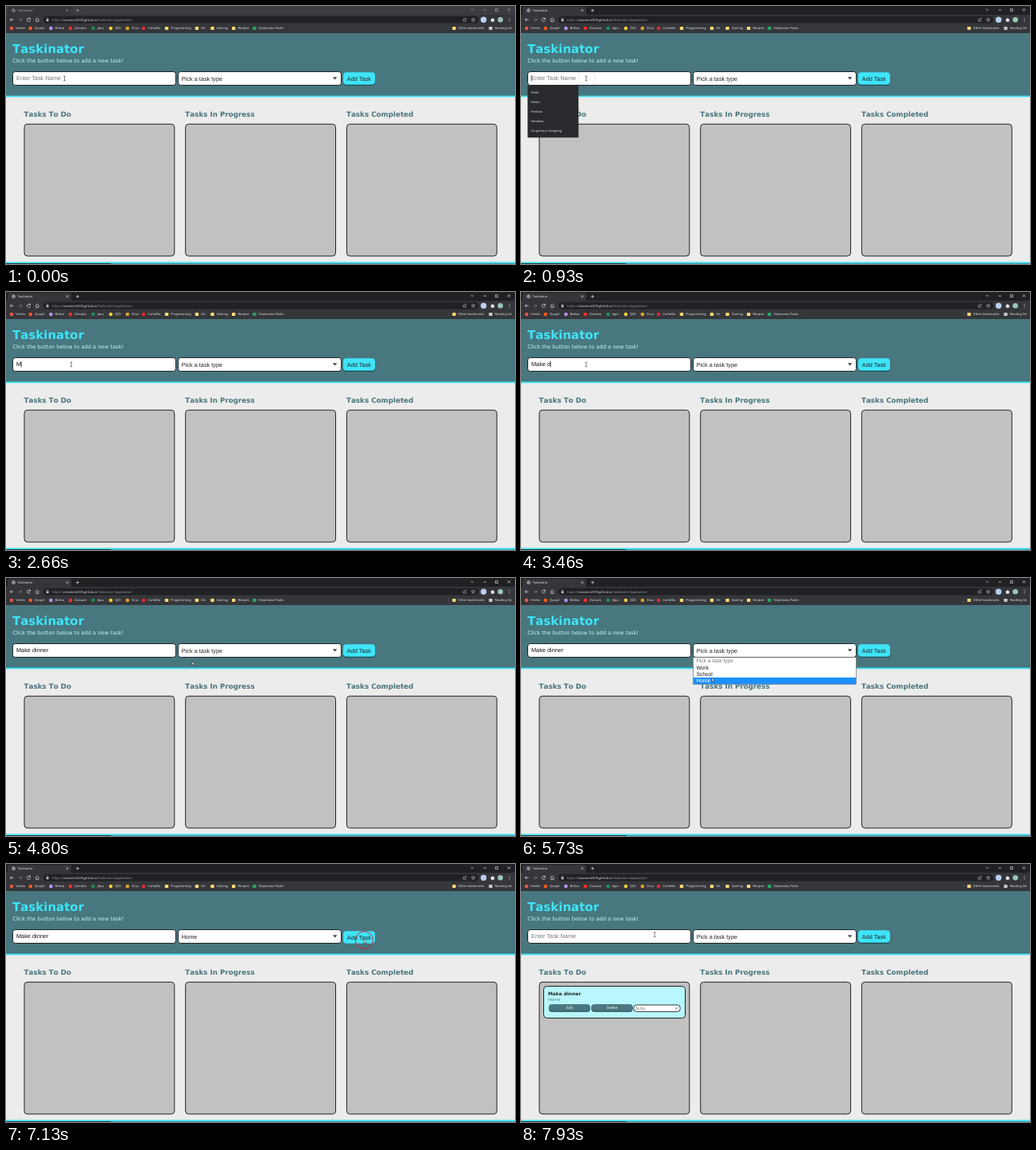
An HTML page that plays this animation: 640x324 px, repeating every 8 s.

```html
<!DOCTYPE html>
<html lang="en">
<head>
<meta charset="utf-8">
<title>Taskinator</title>
<style>
html, body { margin: 0; width: 100%; height: 100%; overflow: hidden; background: #ececec; }
svg { display: block; width: 100vw; height: 100vh; text-rendering: geometricPrecision; }
.ui { font: 4px "Open Sans", "Noto Sans", sans-serif; fill: #e8eaed; }
.dim { fill: #9aa0a6; }
.page { font-family: "DejaVu Sans", Verdana, sans-serif; font-kerning: none; }
.head { font-weight: bold; font-size: 8.75px; fill: #48747c; }
.form { font: 7.33px "Liberation Sans", Arial, sans-serif; fill: #222; }
.small { font: 4.7px "Liberation Sans", Arial, sans-serif; }
.line { fill: none; stroke: #dfe1e5; stroke-width: .7; }
.box { stroke: #1d2426; stroke-width: 1; }
</style>
</head>
<body>
<svg viewBox="0 0 640 324" preserveAspectRatio="none">
  <!-- browser window -->
  <g class="ui">
    <rect id="strip" width="640" height="12"/>
    <path d="M0 11.5Q2 11.5 2 9V3Q2 1 4 1H80Q82 1 82 3V9Q82 11.5 84 11.5Z" fill="#35363a"/>
    <rect y="11" width="640" height="23.5" fill="#35363a"/>
    <rect x="47" y="12.8" width="547" height="8.8" rx="4.4" fill="#202124"/>
    <g id="tabBits">
      <circle class="line" cx="9.5" cy="5.6" r="1.9"/>
      <path class="line" d="M7.6 5.6H11.4M9.5 3.7V7.5" style="stroke-width:.4"/>
      <text x="14.5" y="7.1">Taskinator</text>
      <path class="line" d="M75.8 4.3l2.5 2.5m0-2.5l-2.5 2.5M88 5.6h4M90 3.6v4"/>
      <path class="line" d="M584.5 3.9l1.7 1.6 1.7-1.6M600.3 5h3.6M615.4 3.6h2.9v2.9h-2.9zM630.8 3.2l3.2 3.2m0-3.2l-3.2 3.2"/>
    </g>
    <path class="line" d="M9.3 17.2H5.2m1.9-2l-2 2 2 2M30.3 16.1a2.1 2.1 0 1 0 .2 1.8m0-3.2v1.7h-1.7M37 17.2l2.3-2.2 2.3 2.2M37.8 16.8v2.7h3v-2.7"/>
    <path class="line" d="M16 17.2h4m-1.9-2l2 2-2 2" style="stroke:#85888c"/>
    <path d="M50.7 16.6h2.9v2.6h-2.9z" fill="#bdc1c6"/>
    <path class="line" d="M51.3 16.6v-.8a.8.8 0 0 1 1.7 0v.8" style="stroke-width:.5"/>
    <text x="58" y="18.7"><tspan class="dim">https://</tspan>corwenn2839.github.io<tspan class="dim">/Taskinator-Application/</tspan></text>
    <path class="line" d="M575 16v3h3.5v-1.2M576 17.6q.3-2 2.8-2m-1-1l1 1-1 1" style="stroke-width:.5"/>
    <path class="line" d="M587.5 14.8l.7 1.6 1.7.1-1.3 1.1.4 1.7-1.5-.9-1.5.9.4-1.7-1.3-1.1 1.7-.1z" style="stroke-width:.5"/>
    <circle cx="600.5" cy="17.2" r="3.7" fill="#b9cff0"/>
    <path d="M609.8 16h1.2a.7.7 0 0 1 1.4 0h1.2v1.2a.7.7 0 0 1 0 1.4v1.1h-3.8z"/>
    <circle cx="621.6" cy="17.2" r="3.3" fill="#9cc7b6"/>
    <circle cx="633" cy="15.5" r=".5"/><circle cx="633" cy="17.2" r=".5"/><circle cx="633" cy="18.9" r=".5"/>
    <path d="M556.8 25.5v5" stroke="#5f6368" stroke-width=".4"/>
    <g id="bookmarks"></g>
  </g>

  <!-- page -->
  <rect y="34" width="640" height="79" fill="#48777f"/>
  <rect y="112.6" width="640" height="2" fill="#3ee4f8"/>
  <rect y="114.6" width="640" height="210" fill="#ececec"/>
  <rect y="321.4" width="640" height="2.6" fill="#3ee4f8"/>
  <rect y="323.3" width="640" height=".7" fill="#48777f"/>
  <rect y="323" width="132" height="1" fill="#2b3638"/>
  <g class="page">
    <text x="8" y="59.3" font-size="15" font-weight="bold" fill="#3ee4f8">Taskinator</text>
    <text x="8.3" y="70.7" font-size="6.7" fill="#c4f6fb">Click the button below to add a new task!</text>
    <g id="columns"></g>
  </g>
  <g class="form">
    <rect class="box" x="8.5" y="82.5" width="205" height="17" rx="3.2" fill="#fff"/>
    <text id="name" x="13" y="93.4"></text>
    <path id="caret" d="M0 87v7.6" stroke="#000" stroke-width=".6"/>
    <rect class="box" x="216.5" y="82.5" width="205" height="17" rx="3.2" fill="#fff"/>
    <text id="type" x="220.8" y="93.6"></text>
    <path d="M410.8 89.3h5.6l-2.8 3.2z" fill="#444"/>
    <rect id="shade" x="424" y="84" width="40" height="15.9" rx="4" fill="#1f4a52"/>
    <g id="add">
      <rect x="424" y="83.3" width="40" height="15.4" rx="4" fill="#3ee4f8"/>
      <text x="428.8" y="93.6">Add Task</text>
    </g>
  </g>

  <g id="card">
    <rect class="box" x="28.5" y="153.5" width="178" height="40" rx="4" fill="#b8f7fe"/>
    <g class="page">
      <text x="34" y="165" font-size="5.9" font-weight="bold" fill="#222">Make dinner</text>
      <text x="34" y="171.8" font-size="5.2" fill="#5c7f84">Home</text>
    </g>
    <g class="small" fill="#fff" text-anchor="middle">
      <rect x="35" y="176.6" width="52" height="9.2" rx="3.8" fill="#1f3f45"/>
      <rect x="35" y="176.2" width="52" height="8.6" rx="3.8" fill="#48777f"/>
      <text x="61" y="182.1">Edit</text>
      <rect x="88.5" y="176.6" width="52" height="9.2" rx="3.8" fill="#1f3f45"/>
      <rect x="88.5" y="176.2" width="52" height="8.6" rx="3.8" fill="#48777f"/>
      <text x="114.5" y="182.1">Delete</text>
    </g>
    <rect class="box" x="141.8" y="177" width="58.4" height="8.4" rx="3.6" fill="#fff" style="stroke-width:.9"/>
    <text class="small" x="143.8" y="183" fill="#555">To Do</text>
    <path d="M193.8 180.5l1.5 1.4 1.5-1.4" fill="none" stroke="#222" stroke-width=".8"/>
  </g>

  <g id="suggest" class="ui" font-weight="600">
    <rect x="8.3" y="100" width="64" height="65.3" rx="1" fill="#292a2d"/>
  </g>
  <g id="options" class="form" style="font-size:6.67px">
    <rect x="216.3" y="99.6" width="205.2" height="34" fill="#fff" stroke="#555" stroke-width=".6"/>
    <rect id="pick" x="216.6" width="204.6" height="8.35" fill="#1e90ff"/>
  </g>

  <circle id="ring" fill="none" stroke="#c8283c" stroke-width="1"/>
  <path id="beam" d="M-1.3-2.8h1q.3 0 .3.4v4.8q0 .4-.3.4h-1M1.3-2.8h-1q-.3 0-.3.4M1.3 2.8h-1q-.3 0-.3-.4" fill="none" stroke="#222" stroke-width=".6"/>
  <path id="arrow" d="M0 0v4.6l1-1 .8 1.7.8-.4-.8-1.6h1.5z" fill="#fff" stroke="#111" stroke-width=".5"/>
</svg>
<script>
const LOOP = 8000;
const $ = id => document.getElementById(id);

function add(parent, tag, attrs, text) {
  const node = document.createElementNS("http://www.w3.org/2000/svg", tag);
  for (const key in attrs) node.setAttribute(key, attrs[key]);
  if (text) node.textContent = text;
  return parent.appendChild(node);
}

const FOLDER = "#f8d775";
const bookmarks = [
  ["Vmelo", 7, "#e5574c"], ["Quopli", 30.8, "#ff5a1f"], ["Brelva", 56.5, "#b794f6"],
  ["Zunavio", 81, "#f0302c"], ["Jepu", 109.5, "#1c8f5c"], ["QZX", 131.7, "#f2cf3b"],
  ["Drux", 152.7, "#e0a02c"], ["Corkellia", 173, "#dd2a3b"], ["Programming", 202, FOLDER],
  ["Art", 240, FOLDER], ["Gaming", 259.5, FOLDER], ["Recipes", 286.2, FOLDER],
  ["Stepmania Packs", 312.4, "#27a567"], ["Other bookmarks", 563.4, FOLDER], ["Reading list", 609.4, "#c5c8cc"]
];
for (const [label, x, fill] of bookmarks) {
  if (x > 200) add($("bookmarks"), "rect", { x: x - 2.2, y: 25.9, width: 4.4, height: 4.2, rx: .5, fill });
  else add($("bookmarks"), "circle", { cx: x, cy: 28, r: 2.3, fill });
  add($("bookmarks"), "text", { x: x + 5.2, y: 29.4 }, label);
}

["Tasks To Do", "Tasks In Progress", "Tasks Completed"].forEach((title, i) => {
  const x = 23 + 202.7 * i;
  add($("columns"), "text", { class: "head", x: x - .4, y: 139 }, title);
  add($("columns"), "rect", { class: "box", x, y: 148.3, width: 188.8, height: 165.7, rx: 4, fill: "#c1c1c1" });
});

["Hello", "Henlo", "Henlow", "henelow", "Go grocery shopping"].forEach((word, i) =>
  add($("suggest"), "text", { x: 12.5, y: 110.2 + 12 * i }, word));

const ROW = 8.35, LIST_TOP = 99.9;
const options = ["Pick a task type", "Work", "School", "Home"].map((word, i) =>
  add($("options"), "text", { x: 220.4, y: LIST_TOP + 6.4 + ROW * i }, word));

// Moments of the session, in ms
const FOCUS = 620, SUGGEST = 760, TYPE = 2650, KEY = 140, OPEN = 5130, CHOOSE = 5900,
      PRESS = 7000, SUBMIT = 7220;
const TASK = "Make dinner";
const TYPED = TYPE + KEY * (TASK.length - 1);
const clicks = [FOCUS, OPEN - 50, CHOOSE - 50, PRESS];

// Pointer stops: time, x, y
const path = [
  [0, 73.5, 91], [100, 73.5, 91], [500, 82, 91], [4190, 82, 91], [4720, 233.8, 105],
  [4820, 233.8, 105], [5040, 238, 93], [5200, 238, 93], [5620, 240, 125.6], [6000, 240, 125.6],
  [6720, 450, 95.3], [7330, 450, 95.3], [7930, 168, 88.5], [LOOP, 168, 88.5]
];

function pointerAt(t) {
  const i = path.findIndex(stop => stop[0] > t);
  const [t0, x0, y0] = path[i - 1], [t1, x1, y1] = path[i];
  const u = (t - t0) / (t1 - t0), e = u * u * (3 - 2 * u);
  return [x0 + (x1 - x0) * e, y0 + (y1 - y0) * e];
}

const show = (id, on) => $(id).style.display = on ? "" : "none";
const place = (id, x, y) => $(id).setAttribute("transform", `translate(${x} ${y})`);

function drawForm(t) {
  const count = t < TYPE || t >= SUBMIT ? 0 : Math.min(TASK.length, Math.floor((t - TYPE) / KEY) + 1);
  const name = $("name");
  name.textContent = count ? TASK.slice(0, count) : "Enter Task Name";
  name.style.fill = count ? "#111" : "#757575";

  const typing = t >= TYPE && t < TYPED;
  const blink = (t - (t < TYPE ? FOCUS : TYPED)) % 1000 < 500;
  show("caret", t >= FOCUS && t < OPEN && (typing || blink));
  place("caret", 13.2 + (count ? name.getComputedTextLength() : 0), 0);

  $("type").textContent = t >= CHOOSE && t < SUBMIT ? "Home" : "Pick a task type";
  const pressed = t >= PRESS && t < SUBMIT;
  show("shade", !pressed);
  place("add", 0, pressed ? 1 : 0);
  show("card", t >= SUBMIT);
}

function drawPopups(t, y) {
  show("suggest", t >= SUGGEST && t < TYPE);
  show("options", t >= OPEN && t < CHOOSE);
  const row = Math.max(0, Math.min(3, Math.floor((y - LIST_TOP) / ROW)));
  show("pick", row > 0);
  $("pick").setAttribute("y", LIST_TOP + ROW * row);
  options.forEach((text, i) => text.style.fill = i === 0 ? "#777" : i === row ? "#fff" : "#111");
}

function drawPointer(t, x, y) {
  const overInput = x > 9 && x < 213 && y > 83 && y < 99.5;
  show("beam", overInput);
  show("arrow", !overInput);
  place(overInput ? "beam" : "arrow", x, y);

  const age = clicks.map(c => t - c).find(a => a >= 0 && a < 330);
  show("ring", age !== undefined);
  if (age === undefined) return;
  place("ring", x + .4, y + .4);
  $("ring").setAttribute("r", 11 * Math.min(1, .4 + age / 180));
  $("ring").setAttribute("opacity", Math.min(1, (330 - age) / 150));
}

function draw(t) {
  const [x, y] = pointerAt(t);
  const active = t >= FOCUS;
  $("strip").setAttribute("fill", active ? "#202124" : "#3c3d40");
  $("tabBits").setAttribute("opacity", active ? 1 : .65);
  drawForm(t);
  drawPopups(t, y);
  drawPointer(t, x, y);
}

const start = performance.now();
function tick() {
  draw((performance.now() - start) % LOOP);
  requestAnimationFrame(tick);
}
tick();
</script>
</body>
</html>
```
